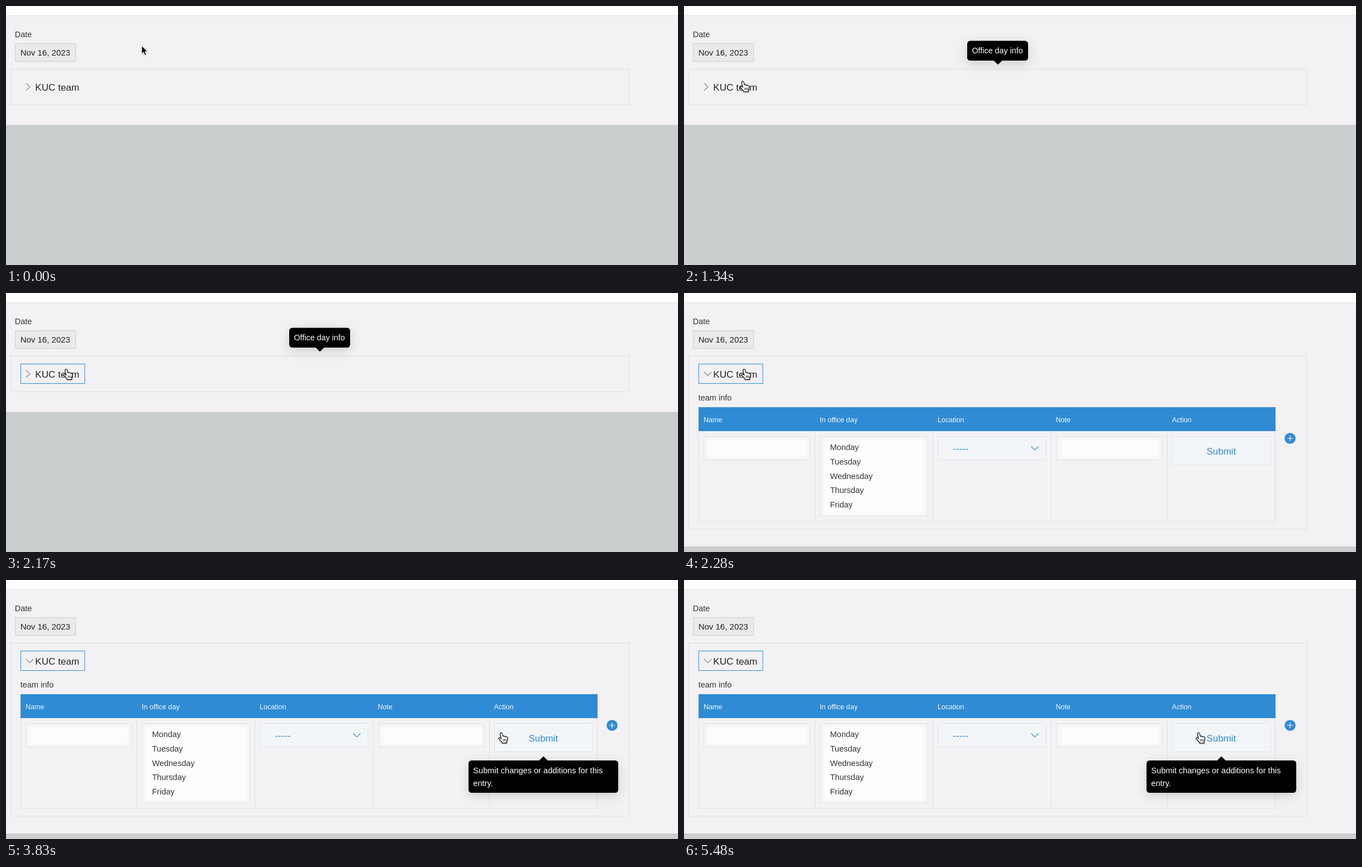
An HTML page that plays this animation: 1203x465 px, repeating every 5630 ms.

```html
<!DOCTYPE html>
<html lang="en">
<head>
<meta charset="utf-8">
<title>Office day form</title>
<style>
html, body { margin: 0; width: 100%; height: 100%; overflow: hidden; background: #f3f1f4; }
svg { display: block; width: 100%; height: 100%; font-family: "Liberation Sans", Arial, sans-serif; }
text { white-space: pre; }
</style>
</head>
<body>
<svg id="stage" viewBox="0 0 1203 465"></svg>
<script>
const LOOP = 5630, OPEN = 2280, FOCUS = 2100;
const BLUE = '#2f8bd4', LINE = '#dfdde1', INK = '#353437';

const rect = (x, y, w, h, fill, stroke = 'none', more = '') =>
  `<rect x="${x}" y="${y}" width="${w}" height="${h}" fill="${fill}" stroke="${stroke}" ${more}/>`;
const text = (x, y, size, str, fill = INK) =>
  `<text x="${x}" y="${y}" font-size="${size}" fill="${fill}">${str}</text>`;
const path = (d, stroke, width = 1.2, fill = 'none') =>
  `<path d="${d}" stroke="${stroke}" stroke-width="${width}" fill="${fill}"/>`;

// White field with a soft grey inner edge
const field = (x, y, w, h) =>
  `<svg x="${x}" y="${y}" width="${w}" height="${h}">` +
  rect(0, 0, w, h, '#f3f2f4') +
  rect(5, 5, w - 9, h - 9, '#fdfcfe', 'none', 'filter="url(#soft)"') + '</svg>' +
  rect(x, y, w, h, 'none', '#e2e1e4');

const heads = [[35, 'Name'], [243, 'In office day'], [454, 'Location'], [665.5, 'Note'], [873.5, 'Action']];
const days = ['Monday', 'Tuesday', 'Wednesday', 'Thursday', 'Friday'];

const table =
  text(25.7, 193, 14.5, 'team info') +
  rect(26.5, 247.5, 1032, 162.5, '#f3f2f4', LINE) +
  [234.5, 446, 657.5, 865.5].map(x => path(`M${x} 248V410`, LINE, 1)).join('') +
  rect(26, 205, 1033, 43, BLUE) +
  heads.map(([x, s]) => text(x, 231.5, 12.6, s, '#f4f9fd')).join('') +
  field(35.5, 257.5, 189.5, 42.5) +
  field(244, 257.5, 192.5, 143.5) +
  days.map((d, i) => text(261.5, 282 + i * 25.8, 14.5, d)).join('') +
  rect(455, 257.5, 193, 42.5, '#f3f6f9', '#dfe4e7') +
  text(481.5, 284.5, 16.8, '-----', BLUE) +
  path('M621.5 275.5L628 282L634.5 275.5', BLUE) +
  field(667, 257.5, 189, 42.5) +
  rect(874.5, 257.5, 175, 51, '#f3f6f9', '#dfe4e7') +
  text(935.5, 289.5, 16.9, 'Submit', BLUE) +
  `<circle cx="1085" cy="261" r="9.8" fill="${BLUE}"/>` +
  path('M1080 261H1090M1085 256V266', '#fff', 1.2);

const tip = (id, x, y, w, h, arrow, words) =>
  `<g id="${id}"><g filter="url(#drop)">${rect(x, y, w, h, '#000', 'none', 'rx="5.5"')}</g>` +
  path(arrow, 'none', 0, '#000') + words + '</g>';

document.getElementById('stage').innerHTML = `
<defs>
  <filter id="soft"><feGaussianBlur stdDeviation="3"/></filter>
  <filter id="drop" x="-40%" y="-80%" width="180%" height="280%">
    <feDropShadow dx="0" dy="5" stdDeviation="10" flood-opacity=".16"/></filter>
  <filter id="faint" x="-40%" y="-40%" width="180%" height="180%">
    <feDropShadow dx="0" dy="1" stdDeviation=".8" flood-opacity=".3"/></filter>
</defs>` +
  rect(0, 0, 1203, 465, '#f3f1f4') +
  rect(0, 0, 1203, 17, '#fdfcfe') +
  rect(0, 17, 1203, 1, '#dddcdf') +
  text(15.7, 56, 14.5, 'Date') +
  rect(16.5, 67.5, 108, 32, '#ebe9ec', '#cecdd0') +
  text(25.7, 88.7, 15, 'Nov 16, 2023', '#242326') +
  rect(8.5, 113.5, 1107, 63.5, 'none', LINE, 'id="panel"') +
  rect(26.5, 127.5, 114.5, 35, 'none', BLUE, 'id="focus"') +
  '<path id="chevron" fill="none" stroke="#7f7e82" stroke-width="1.1"/>' +
  text(52.3, 151.5, 17.15, 'KUC team', '#242326') +
  `<g id="table">${table}</g>` +
  '<rect id="floor" x="0" width="1203" height="252"/>' +
  tip('tip1', 507, 62.5, 109, 35.5, 'M554 97.5H570L562 105.3Z', text(515.5, 85.3, 14.3, 'Office day info', '#fff')) +
  tip('tip2', 828, 324, 268, 58, 'M954 324.5H970L962 316.5Z',
    text(836.3, 347, 14.6, 'Submit changes or additions for this', '#fff') +
    text(836.3, 370, 14.6, 'entry.', '#fff')) +
  `<g id="cursor" filter="url(#faint)">
    <g id="arrow"><path d="M0 0V14.4L3.3 11.3L5.7 16.8L8.2 15.7L5.9 10.4H10.3Z" fill="#000" stroke="#fff" stroke-width=".9"/></g>
    <g id="hand">` +
    path('M-1.4 1.2C-.6 -.3 1.2 0 1.8 1.5L3.6 6.8C4.6 5.9 6 6.2 6.4 7.3C7.4 6.5 8.8 6.9 9.2 8C10.4 7.5 11.6 8.3 11.6 9.8C11.8 13 11 14.5 10.2 16V18.8H2C1.5 16.5 -1 14.5 -4 11.2C-5 9.8 -3.3 8.2 -1.6 9.6L.2 11L-1.6 3.5C-1.9 2.6 -1.8 1.8 -1.4 1.2Z', '#111', 1.2, '#fff') +
    path('M3.8 11.7V15.8M6.2 11.7V15.8M8.6 11.7V15.8', '#111', 1) + '</g></g>';

const el = {};
document.querySelectorAll('[id]').forEach(e => el[e.id] = e);
const set = (e, attrs) => { for (const k in attrs) e.setAttribute(k, attrs[k]); };
const show = (e, on) => set(e, { visibility: on ? 'visible' : 'hidden' });
const clamp = v => Math.max(0, Math.min(1, v));
const ease = v => v * v * (3 - 2 * v);

// Cursor hot spot: time, x, y
const route = [
  [280, 243, 71.5], [600, 70, 118], [830, 102, 128], [1100, 105, 135], [1480, 105, 135],
  [1720, 101, 135], [2030, 107.5, 136.5], [2440, 107.5, 136.5], [2630, 170, 151],
  [2800, 891, 266], [3000, 891, 266], [3290, 886, 273], [3790, 886, 273],
  [4060, 891, 287], [4160, 891, 287], [4550, 921, 274], [LOOP, 921, 274]
];

function place(t) {
  const i = route.findIndex(p => p[0] > t);
  if (i === 0) return route[0].slice(1);
  const [t0, x0, y0] = route[i - 1], [t1, x1, y1] = route[i];
  const k = ease((t - t0) / (t1 - t0));
  return [x0 + (x1 - x0) * k, y0 + (y1 - y0) * k];
}

const within = (x, y, l, t, r, b) => x >= l && x <= r && y >= t && y <= b;

function draw(t) {
  const open = t >= OPEN;
  set(el.panel, { height: open ? 310.5 : 63.5 });
  set(el.floor, { y: open ? 455 : 213.5, fill: open ? '#cccdcf' : '#cbcecf' });
  set(el.chevron, { d: open ? 'M36 142L42.5 148.5L49 142' : 'M36 139L43 145.2L36 151.5' });
  show(el.focus, t >= FOCUS);
  show(el.table, open);
  set(el.tip1, { opacity: open ? 0 : clamp((t - 930) / 180) });
  set(el.tip2, { opacity: clamp((t - 3340) / 180) });

  const [x, y] = place(t);
  const link = within(x, y, 26, 127, 141, 163) || (open && within(x, y, 874, 257, 1050, 309));
  set(el.cursor, { transform: `translate(${x} ${y})` });
  show(el.arrow, !link);
  show(el.hand, link);
}

const start = performance.now();
function tick() {
  draw((performance.now() - start) % LOOP);
  requestAnimationFrame(tick);
}
tick();
</script>
</body>
</html>
```
